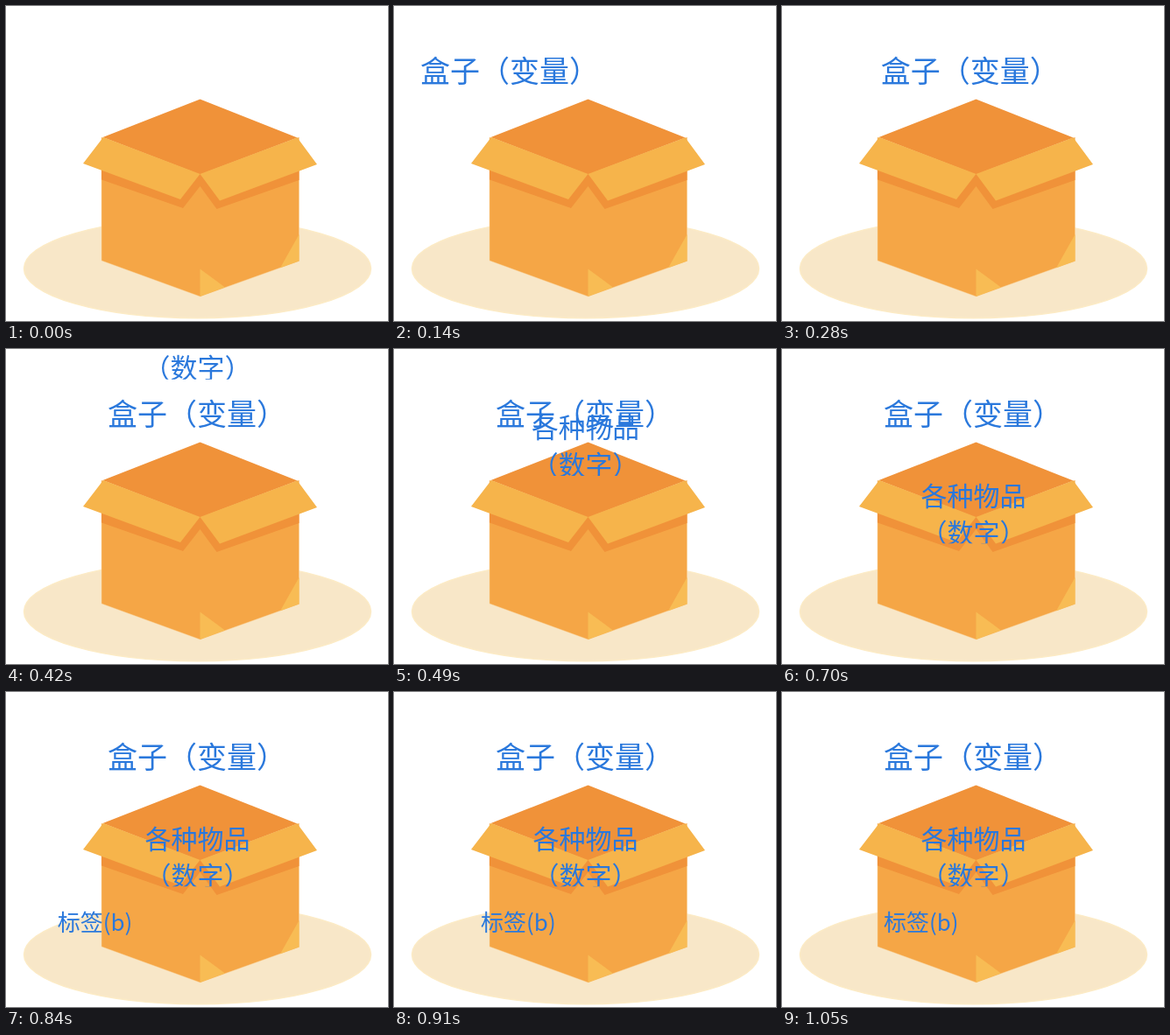
Recreate the animation shown at these times as an HTML page. Size 436 by 360 pixels, loop 1890 ms.

```html
<!DOCTYPE html>
<html lang="zh-CN">
<head>
<meta charset="utf-8">
<title>盒子（变量）</title>
<style>
  html, body { margin: 0; width: 100%; height: 100%; overflow: hidden; background: #fff; }
  svg { display: block; width: 436px; height: 360px; }
  text {
    font-family: "Noto Sans CJK SC", "Noto Sans CJK", "Noto Sans", sans-serif;
    text-spacing-trim: space-all;
    fill: #2a78dc;
  }
  #title { font-size: 34px; fill: #008cb0; }
  #items { font-size: 30px; }
  #label { font-size: 26px; }
</style>
</head>
<body>
<svg viewBox="0 0 436 360">
  <defs>
    <clipPath id="crop"><rect x="140" y="140" width="160" height="82.3"/></clipPath>
  </defs>

  <ellipse cx="218.5" cy="300" rx="198" ry="56.7" fill="#f8e7c8" stroke="#fcebc6" stroke-width="1.5"/>

  <!-- box -->
  <path d="M109 150V291L221.5 332L334.5 291.5V150L221.5 192Z" fill="#f5a646" stroke="#fad6a0" stroke-width=".5"/>
  <path d="M221.5 300.5L250 321.5L221.5 332ZM334.5 261V291.5L313 299.2Z" fill="#f8bc54"/>
  <path d="M109 180V198.5L202 231L221.5 206L240.5 232L334.5 199V180L221.5 190Z" fill="#f09239"/>
  <path d="M110.5 150L221.5 106.5L332.5 150.5L221.5 192.5Z" fill="#f09239"/>
  <path d="M111 150L221.5 192L199 221L88 180ZM332.5 150.5L355 181L244 222.5L221.5 192Z" fill="#f6b44b"/>

  <g id="title"><text x="116" y="87">盒子（变量）</text></g>
  <g id="items">
    <g clip-path="url(#crop)">
      <text x="158.5" y="179">各种物品</text>
      <text x="158.5" y="221">（数字）</text>
    </g>
  </g>
  <g id="label"><text x="116" y="272.5">标签(b)</text></g>
</svg>
<script>
  const STEP = 70, LOOP = 1890, FLIGHT = 5;
  const el = id => document.getElementById(id);
  const title = el("title"), items = el("items"), label = el("label");

  // Steps left in a flight that begins at the given step.
  const left = (step, start) => Math.max(0, Math.min(FLIGHT, start + FLIGHT - step));

  function draw(ms) {
    const step = Math.floor((ms % LOOP) / STEP);
    const a = left(step, 0), b = left(step, 5), c = left(step, 10);
    title.setAttribute("transform", `translate(${-3.185 * a ** 3} 0)`);
    items.setAttribute("transform",
      `translate(218.5 ${209 - 2.63 * b ** 3.08}) scale(${1 + 0.008 * b}) translate(-218.5 -209)`);
    label.setAttribute("transform", `translate(${-2.12 * c ** 3} 0)`);
  }

  const t0 = performance.now();
  function tick() {
    draw(performance.now() - t0);
    requestAnimationFrame(tick);
  }
  draw(0);
  requestAnimationFrame(tick);
</script>
</body>
</html>
```
